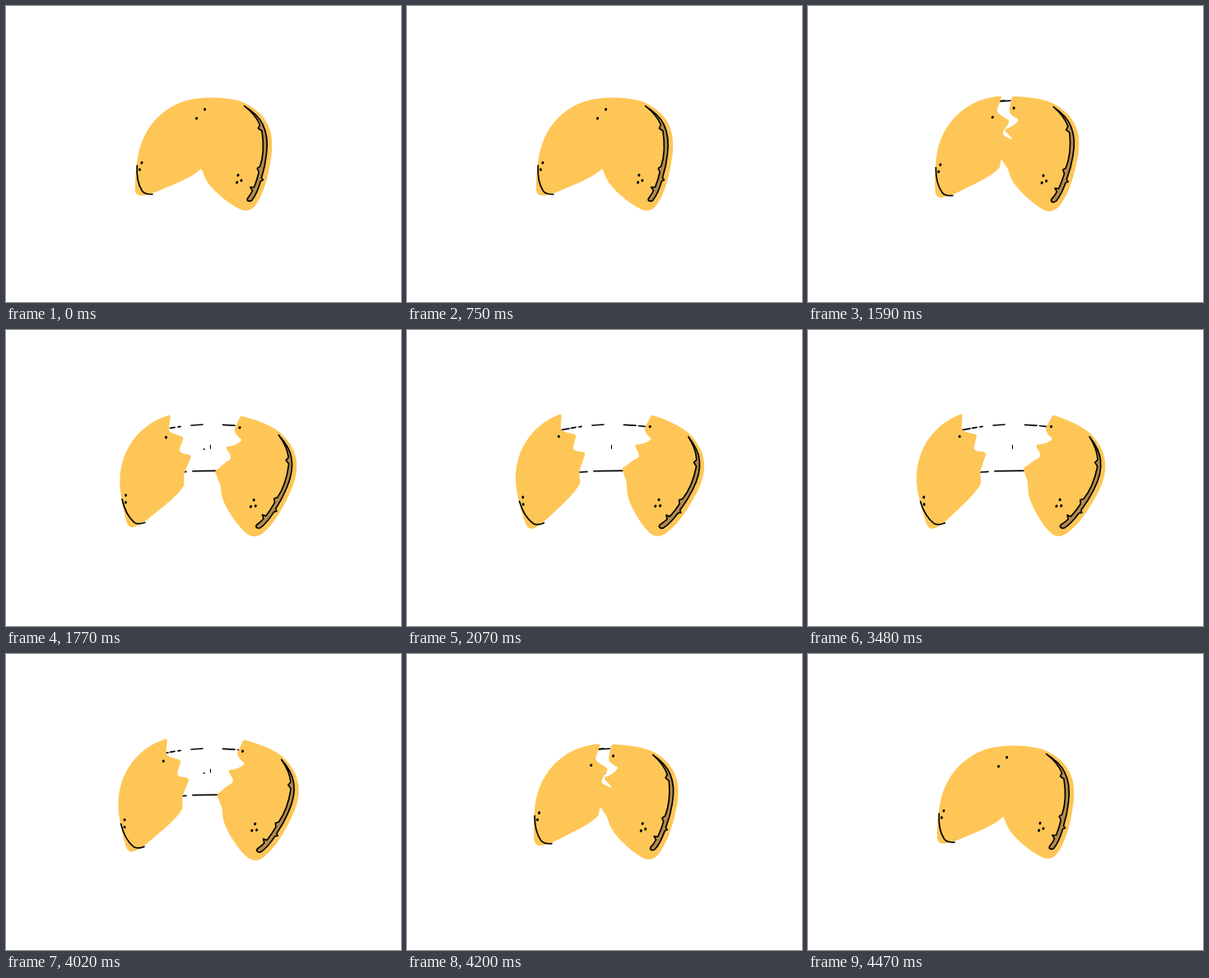
An HTML page for the animation above (4.5 s loop, 480x360 px).

```html
<!DOCTYPE html>
<html lang="en">
<head>
<meta charset="utf-8">
<title>Fortune cookie</title>
<style>
  html, body { margin: 0; width: 100%; height: 100%; overflow: hidden; background: #fff; }
  svg { display: block; width: 480px; height: 360px; }
  .dough { fill: #fec656; }
  .line { fill: none; stroke: #000; stroke-width: 1.7; stroke-linecap: round; stroke-linejoin: round; }
  .rim { fill: #b48b49; }
  .thin { stroke-width: 1.1; }
</style>
</head>
<body>
<svg viewBox="0 0 480 360">
  <clipPath id="gap"><rect id="gapRect" y="100" height="90"/></clipPath>
  <g clip-path="url(#gap)">
    <path class="line" d="M187 121.6L197 119.8M199.5 119.3L205 118.4M209 117.8L212 117.4M225 116L239 115M263.5 115.4L278 116.2M281.5 116.5L292 117.8
      M208 173L219 172.3M227 171.7L264 171.1"/>
    <path class="line thin" d="M248.5 140V144.3"/>
    <path id="extra" class="line" d="M233 116L248 115"/>
    <path id="speck" class="line" d="M240.8 144.6V145.1"/>
  </g>
  <g id="right">
    <path class="dough" d="M241 111.7C262 111.2 278 113 289 117.5C301 123 312 131.5 318 144C324 156 324.5 172 321.5 188C318.5 208 313 228 304 241
      C299 249 291 250.5 284 247C270 240 250 224 243 211C240 205 239 199 234.5 195L228.3 187Q226.5 184.5 229 182.3C232 179 235 172 239 168.5
      Q242.5 165.5 240.5 162.5C238 158 234 157 232.8 154Q232 152 234.5 151.5C240 149.5 245 145 247.2 141.5Q248.5 139.3 246.5 138.5
      C243 137 238.5 134.5 236.8 131.5Q235.8 129.5 236.3 127L238.3 114Q238.5 111.7 241 111.7Z"/>
    <path class="line rim" d="M289.6 121.6C297.5 126.5 307 133 312 144C317 154 318 168 316.5 180C315.5 190 313 201 310.5 209L312.5 211.5L309.5 213
      C306.5 223 303 231 299 236Q296 238.5 293.5 236.5Q292.5 234.5 295 232Q298 228 299.5 224.5L296.8 220.3L301.5 220.5
      Q305 212 307.3 202L305.3 197.5L308.8 195C312.5 184 313.5 168 311 152L306.5 148.7L308.5 144.5C304.5 135 298 128 289.6 121.6Z"/>
  </g>
  <g id="left">
    <path class="dough" d="M242 111.7C222 112 203 118.5 186.5 133.3C169.5 149.5 162 168 159.2 190C157.5 204 156.6 215 157 224Q157.7 231 165 230.6
      C174 230 183 226 192 222C210 214.5 227 207.5 236.5 198.5Q239 188 241 184L253 169.5Q255 166.7 253 164.9C249 162.5 245 161.5 243.3 158.5
      Q242.3 156.5 244 154L250.5 145Q252.2 142.3 249.5 140.3C245 137.5 241 134.5 238.5 132Q236.8 130 237.6 127.5L243.6 114Q244 111.7 242 111.7Z"/>
    <path class="line" d="M159.3 194C158.5 206 161 218 165.5 225Q168.5 229.3 178 229"/>
  </g>
</svg>
<script>
  const LOOP = 4500;
  const $ = id => document.getElementById(id);
  const left = $('left'), right = $('right'), gap = $('gapRect');

  function addDots(piece, points) {
    for (const [x, y] of points) {
      const dot = document.createElementNS('http://www.w3.org/2000/svg', 'ellipse');
      const attrs = { cx: x, cy: y, rx: 1.5, ry: 1.8, transform: `rotate(15 ${x} ${y})` };
      for (const name in attrs) dot.setAttribute(name, attrs[name]);
      piece.append(dot);
    }
  }
  addDots(left, [[231.6, 136.7], [165, 190.7], [162.4, 199]]);
  addDots(right, [[241.6, 125.8], [282, 205.8], [286, 212.2], [280.7, 214.6]]);

  // cubic-bezier(.8, 0, .2, 1), solved by bisection
  function ease(x) {
    if (x <= 0) return 0;
    if (x >= 1) return 1;
    let lo = 0, hi = 1, s;
    for (let i = 0; i < 24; i++) {
      s = (lo + hi) / 2;
      const r = 1 - s;
      if (2.4 * s * r * r + 0.6 * s * s * r + s * s * s < x) lo = s; else hi = s;
    }
    return s * s * (3 - 2 * s);
  }

  const openness = t => ease((t - 1245) / 900) - ease((t - 3735) / 765);

  function pose(piece, p, dx, dy, angle, cx, cy) {
    piece.setAttribute('transform', `translate(${dx * p} ${dy * p}) rotate(${angle * p} ${cx} ${cy})`);
  }

  function draw(t) {
    const p = openness(t);
    pose(left, p, -35.7, 2.8, -20.5, 198, 164);
    pose(right, p, 39, -4, 20, 261.5, 166);
    gap.setAttribute('x', 237 - 50 * p);
    gap.setAttribute('width', p > 0.01 ? 1 + 103 * p : 0);
    $('extra').style.opacity = p < 0.3 ? 1 : 0;
    $('speck').style.opacity = p < 0.9 ? 1 : 0;
  }

  const start = performance.now();
  function tick() {
    draw((performance.now() - start) % LOOP);
    requestAnimationFrame(tick);
  }
  tick();
</script>
</body>
</html>
```
